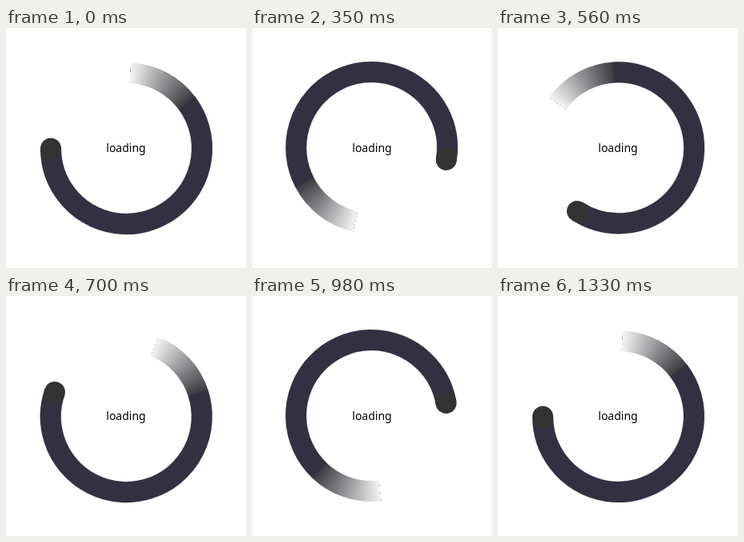
An HTML page with a canvas that plays this animation: 300 px wide and 300 px high, repeating every 1400 ms.

```html
<!DOCTYPE html>
<html lang="en">
<head>
<meta charset="utf-8">
<title>Loading ring</title>
<style>
  html, body { margin: 0; width: 100%; height: 100%; overflow: hidden; background: #fff; }
  canvas { display: block; }
</style>
</head>
<body>
<canvas id="stage" width="300" height="300"></canvas>
<script>
const ctx = document.getElementById('stage').getContext('2d');
const RAD = Math.PI / 180;
const STEP_MS = 70, STEPS = 20, TURNS = 2;
const RADIUS = 94.5, WIDTH = 26;
const TAIL = -87, SOLID = -37, HEAD = 180;

const fade = ctx.createConicGradient(TAIL * RAD, 0, 0);
fade.addColorStop(0, '#f4f4f4');
fade.addColorStop((SOLID - TAIL) / 360, '#3a3a40');

function arc(from, to, color, width = WIDTH, cap = 'butt') {
  ctx.beginPath();
  ctx.arc(0, 0, RADIUS, from * RAD, to * RAD);
  ctx.strokeStyle = color;
  ctx.lineWidth = width;
  ctx.lineCap = cap;
  ctx.stroke();
}

function draw(time) {
  // The last step of the loop shows the same pose as the first.
  const step = Math.floor(time / STEP_MS) % STEPS;
  ctx.fillStyle = '#fff';
  ctx.fillRect(0, 0, 300, 300);

  ctx.save();
  ctx.translate(150, 150);
  ctx.rotate(step * TURNS * 2 * Math.PI / (STEPS - 1));
  ctx.translate(0.5, 0.5);
  arc(SOLID, HEAD, '#dcdce2', WIDTH + 1);
  arc(TAIL, SOLID + 0.5, fade);
  arc(SOLID, HEAD, '#323041');
  arc(HEAD - 1, HEAD, '#333', WIDTH, 'round');
  ctx.restore();

  ctx.fillStyle = '#000';
  ctx.font = '14px "Noto Sans", sans-serif';
  ctx.textAlign = 'center';
  ctx.fillText('loading', 150, 155);
}

const start = performance.now();
function tick() {
  draw(performance.now() - start);
  requestAnimationFrame(tick);
}
tick();
</script>
</body>
</html>
```
